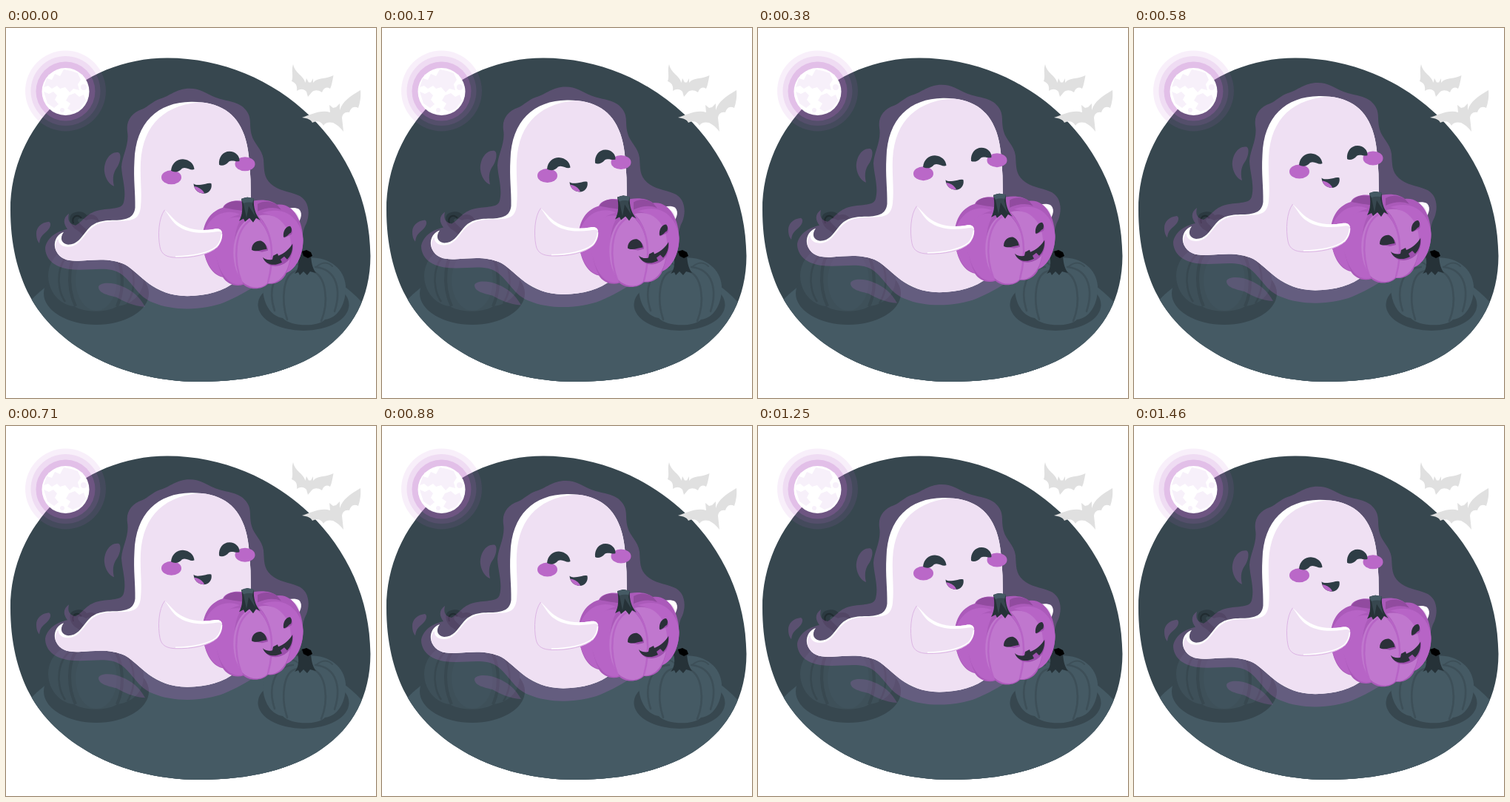
An HTML page for the animation above (1.5 s loop, 500x500 px).

```html
<!DOCTYPE html>
<html lang="en">
<head>
<meta charset="utf-8">
<title>Floating ghost</title>
<style>
  html, body { margin: 0; width: 100%; height: 100%; overflow: hidden; background: #fff; }
  svg { display: block; width: 100vw; height: 100vh; }
</style>
</head>
<body>
<svg viewBox="0 0 500 500">
  <defs>
    <path id="blob" d="M218 40.500C366 40.500 492.500 160 492.500 308C492 422 397 478 262 478C150 478 65 425 32 362C15 330 6 290 6 246C6 132 101 40.500 218 40.500Z"/>
    <path id="body" d="M250 100C205 100.500 175 128 173.500 180C172 205 175 222 174.500 243C173 255 166 259 150 260C132 260 120 261 110 273C101 284 96 293 84 293C75 292 72 284 78 276C67 280 63 292 68 302C73 312 83 315.500 98 315C125 313 143 311.500 161 320C183 333 198 362 245 362.500C300 362 334 335 334 290C331 262 331 232 330.500 205C329 180 328 162 322 145C311 114 287 99.500 250 100Z"/>
    <path id="mouth" d="M253.500 210.500C257 213.500 261 212 264 212C269 212 273 209 277.500 210.500C279 218 274 224 267 224C259 223.500 254 218 253.500 210.500Z"/>
    <clipPath id="inBlob"><use href="#blob"/></clipPath>
    <clipPath id="inBody"><use href="#body"/></clipPath>
    <clipPath id="inMouth"><use href="#mouth"/></clipPath>
    <clipPath id="inMoon"><circle cx="80.500" cy="86" r="32"/></clipPath>
  </defs>

  <use href="#blob" fill="#37474f"/>
  <g clip-path="url(#inBlob)" fill="#455a64">
    <ellipse cx="256" cy="437" rx="253" ry="145"/>
    <rect y="437" width="500" height="63"/>
  </g>

  <!-- moon -->
  <g fill="#ba68c8">
    <circle cx="80.500" cy="85" r="54.500" opacity=".1"/>
    <circle cx="80.500" cy="85" r="47" opacity=".14"/>
    <circle cx="80.500" cy="85.500" r="40" opacity=".25"/>
  </g>
  <circle cx="80.500" cy="86" r="32" fill="#fff"/>
  <g clip-path="url(#inMoon)" fill="#f7f0fa">
    <path d="M55 68L62 70 66 62 73 65 78 56 88 58 97 61 101 70 97 76 99 84 91 82 86 87 80 80 73 82 69 78 62 82 57 78 51 80Z"/>
    <path d="M51 86L58 89 64 86 69 91 66 97 71 103 65 108 56 102Z"/>
    <path d="M85 91L93 88 99 93 105 90 108 98 100 109 90 113 83 109 87 102 81 98Z"/>
    <circle cx="105" cy="80" r="4"/><circle cx="76" cy="111" r="3"/>
  </g>

  <!-- bats -->
  <g fill="#e0e0e0">
    <path d="M388 49C390 61 402 64 404.500 74L406 68 409 73.500 412 73.500 415 68 415 74C421 66 431 70 442.500 64C441 72 440 78 438 82C433 79 429 81 427 87C421 83 416 84 413 87L408 93 406 86C402 82 398 82 393 85C394 77 391 74 386 72C389 65 385 58 388 49Z"/>
    <path d="M400 121C412 117 426 110 438 114L437 104 442 108 446 107 451 102 451 111C455 99 464 93 479 84C480 94 478 102 476 108C470 105 466 108 464 114C458 113 455 116 454 121L456 140C452 134 446 130 442 128C437 127 432 127 429 132C426 126 420 125 414 128C412 124 408 122 400 121Z"/>
  </g>

  <!-- left pumpkin -->
  <ellipse cx="122" cy="358.500" rx="71" ry="42.500" fill="#37474f"/>
  <path d="M122 292C85 288 57 305 57 336C58 360 76 375 92 376C105 385 138 385 150 376C170 374 186 360 186 338C185 308 160 288 122 292Z" fill="#3e5059"/>
  <g fill="none" stroke="#384850" stroke-width="4">
    <path d="M106 297C82 305 82 350 94 376"/>
    <path d="M138 297C158 305 162 350 150 376"/>
    <path d="M94 300C68 312 66 350 80 370" stroke-width="2.500"/>
    <path d="M152 300C175 312 178 350 164 372" stroke-width="2.500"/>
  </g>
  <ellipse cx="122" cy="341" rx="28" ry="41" fill="#40535d"/>
  <path d="M108 300C111 285 103 277 94 272C86 266 83 253 91 250C98 247 106 248 109 253C119 250 124 255 126 262C118 257 113 258 108 260C103 257 98 256 97 260C99 267 118 275 128 300Z" fill="#2c3a41"/>
  <path d="M91 264C88 254 97 251 102 257" fill="none" stroke="#212c31" stroke-width="2"/>

  <!-- right pumpkin -->
  <ellipse cx="402" cy="374" rx="61.500" ry="35" fill="#37474f"/>
  <path d="M400 311C372 308 347 325 347 352C348 376 360 390 374 392C383 403 421 405 431 394C448 392 460 374 459 348C457 323 433 306 400 311Z" fill="#455a64"/>
  <g fill="none" stroke="#3d4f58" stroke-width="2.600" stroke-linecap="round">
    <path d="M394 328C373 330 372 370 380 394"/>
    <path d="M412 328C434 333 436 372 426 396"/>
    <path d="M388 323C361 325 354 355 363 382"/>
    <path d="M418 323C448 326 453 355 444 383"/>
    <path d="M376 318Q390 312 398 324M420 322Q432 313 441 322" stroke-width="2"/>
  </g>
  <path d="M390 332C396 326 396 315 394 308L400 301 412 304C412 315 414 325 419 331L411 329 407 334 402 329 397 334 395 330Z" fill="#263238"/>
  <path d="M400 302L406 300 412 303 414 308 408 311 402 308Z" fill="#000"/>

  <g id="ghost">
    <!-- aura -->
    <g fill="#ba68c8" opacity=".27">
      <path d="M248 82C230 82 222 92 208 96C197 100 193 106 184 110C170 115 162 125 164 140C167 158 157 172 156 188C157 205 163 220 159 236C156 246 142 243 124 247C108 251 104 262 94 267C85 265 83 260 85 251C77 257 77 264 83 272C70 275 56 282 53 297C53 313 66 323 84 326C112 330 138 320 156 333C172 345 178 363 198 371C228 384 270 381 295 371C312 364 325 356 340 347L392 313C400 296 399 276 406 264C412 248 408 231 394 226C382 221 368 220 358 211C348 202 349 192 348 178C346 163 335 157 332 145C328 130 333 122 324 111C315 99 299 100 283 94C268 88 263 82 248 82Z"/>
      <path d="M152 168.500C140 167 132 181 133 194C134 204 140 212 146 214C143 201 146 194 151 187C155 180 156 170 152 168.500Z"/>
      <path d="M58 262C47 263 41 270 41 278C41 285 43 289 45 291C46 283 49 280 54 276C60 271 62 264 58 262Z"/>
    </g>
    <path d="M125 350C127 343 145 344 156 349C171 355 180 363 188 377C172 376 160 370 149 364C136 361 125 358 125 350Z" fill="#ba68c8" opacity=".22"/>

    <!-- far hand -->
    <path d="M374 246C382 243 391 242 396 245C402 251 398 262 390 269Z" fill="#efe0f3"/>
    <path d="M381 245C388 243 394 243 397 247C400 252 398 257 396 261C396 252 392 247 381 245Z" fill="#fff"/>

    <!-- body -->
    <use href="#body" fill="#fff"/>
    <path clip-path="url(#inBody)" d="M270 100C215 102 185 130 182 182C181 205 184 222 182 242C180 260 170 261 150 261C132 261 121 264 111 275C102 286 96 296 84 296C75 296 70 291 71 285C62 294 65 320 98 320L160 330L240 370L350 350V100Z" fill="#efe0f3"/>

    <!-- face -->
    <g fill="#ba68c8">
      <ellipse cx="223.500" cy="202" rx="13.500" ry="9.500"/>
      <ellipse cx="323" cy="184" rx="13.500" ry="9.500"/>
    </g>
    <g fill="#2e3d45">
      <path d="M223 193C224 183 231 177.500 239 177.500C248 178 254 184 254.500 191C250 194 244 187 238 190C234 195 228 196 223 193Z"/>
      <path d="M288 185C287 175 293 167 302 167C310 167 316 173 315.500 180C311 182 306 178 301 181C297 186 291 187 288 185Z"/>
      <use href="#mouth"/>
    </g>
    <g clip-path="url(#inMouth)">
      <ellipse cx="259" cy="221" rx="10" ry="5" transform="rotate(30 259 221)" fill="#ba68c8"/>
    </g>

    <!-- carried pumpkin -->
    <path d="M293 243C298 232 318 232 328 236C340 231 358 232 366 239C389 236 401 262 401.500 285C402 309 391 326 379 331C375 342 364 347 354 346C345 355 328 354 321 347C309 351 298 345 293 337C277 334 267 314 265.500 288C265 268 273 249 293 243Z" fill="#ab5aba"/>
    <path d="M294 243C300 232 316 233 326 238L328 249C314 246 302 245 294 243ZM340 238C350 232 362 235 367 240L372 246C361 241 350 244 340 248Z" fill="#914b9f"/>
    <g fill="#b764c6">
      <path d="M316 252C294 242 268 257 266 287C266 315 281 335 293 336C277 303 280 260 316 252Z"/>
      <path d="M319 257C290 250 273 282 286 316C291 336 305 350 319 346C306 320 304 275 319 257Z"/>
      <path d="M346 250C385 237 401 268 401.500 287C401 310 390 327 379 331C393 296 385 257 346 250Z"/>
    </g>
    <path d="M341 254C370 246 391 275 384 309C382 332 368 347 354 345C363 309 361 271 341 254Z" fill="#c077ce"/>
    <path d="M328 258C309 268 301 304 313 332C318 350 342 357 353 345C366 317 360 274 339 258Z" fill="#c077ce"/>
    <path d="M330 260C309 274 306 312 319 346M341 257C361 275 363 310 354 344" fill="none" stroke="#b764c6" stroke-width="2.500"/>
    <path d="M315 261C320 253 320 241 318 231L326 229 335 231C334 242 337 253 344 260L338 257 334 263 329 257 323 262 321 258Z" fill="#263238"/>
    <path d="M318 232L326 229 335 231 333 239 337 255 328 241 325 257 321 238Z" fill="#37474f"/>
    <path d="M318 231.500Q326 227 335 231L333 236Q326 235 321 237Z" fill="#455a64"/>
    <path d="M335 301C335 292 343 288 349 291C353 294 354 298 354 301L346 303ZM376 284C375 276 379 270 384 269C388 272 387 277 386 279ZM350 312C361 318 378 310 388 291C389 311 379 321 364 322C357 322 351 319 350 312Z" fill="#9d4fad"/>
    <path d="M332 300C332 291 339 287 345 288C350 290 352 295 352.500 299C347 299 338 304 332 300ZM375 283C374 275 378 268 384 268C387 271 386 275 385 277C382 278 380 283 375 283ZM347 310C351 314 356 314 360 313L361 308 367 305 368 308C376 305 383 299 387 292C388 302 384 309 380 313L376 309 371 313 373 317C362 323 350 320 347 310Z" fill="#2b3039"/>

    <!-- near arm -->
    <path d="M214.500 246C206 257 205 281 208 296C210 307 218 310 229 310.500C251 311 274 307 286 296C291 290 293 283 292 277C291 272 287 271 281 272C268 274 255 274 243 269C228 263 222 252 214.500 246Z" fill="#efe0f3"/>
    <path d="M214.500 246C222 252 228 263 243 269C255 274 268 274 281 272C287 271 291 272 292 277C290 275 286 275 281 276C260 279 243 276 231 267C223 260 220 253 214.500 246Z" fill="#fff"/>
    <path d="M214.500 246C206 257 205 281 208 296C210 307 218 310 229 310.500C251 311 274 307 286 296" fill="none" stroke="#dcb5e4" stroke-width="1"/>
    <path d="M229 309C252 309 274 304 284 296C289 291 291 285 291.500 279" fill="none" stroke="#fff" stroke-width="1.500"/>
  </g>
</svg>
<script>
  const LOOP = 1500, LIFT = 10, LEAD = 20;
  const ghost = document.getElementById("ghost");

  // Steady rise and fall, turning at half the loop
  function draw(ms) {
    const p = ((ms + LEAD) % LOOP) / LOOP;
    const y = -LIFT * (1 - Math.abs(1 - 2 * p));
    ghost.setAttribute("transform", `translate(0 ${y.toFixed(3)})`);
  }

  const start = performance.now();
  function tick() {
    draw(performance.now() - start);
    requestAnimationFrame(tick);
  }
  tick();
</script>
</body>
</html>
```
